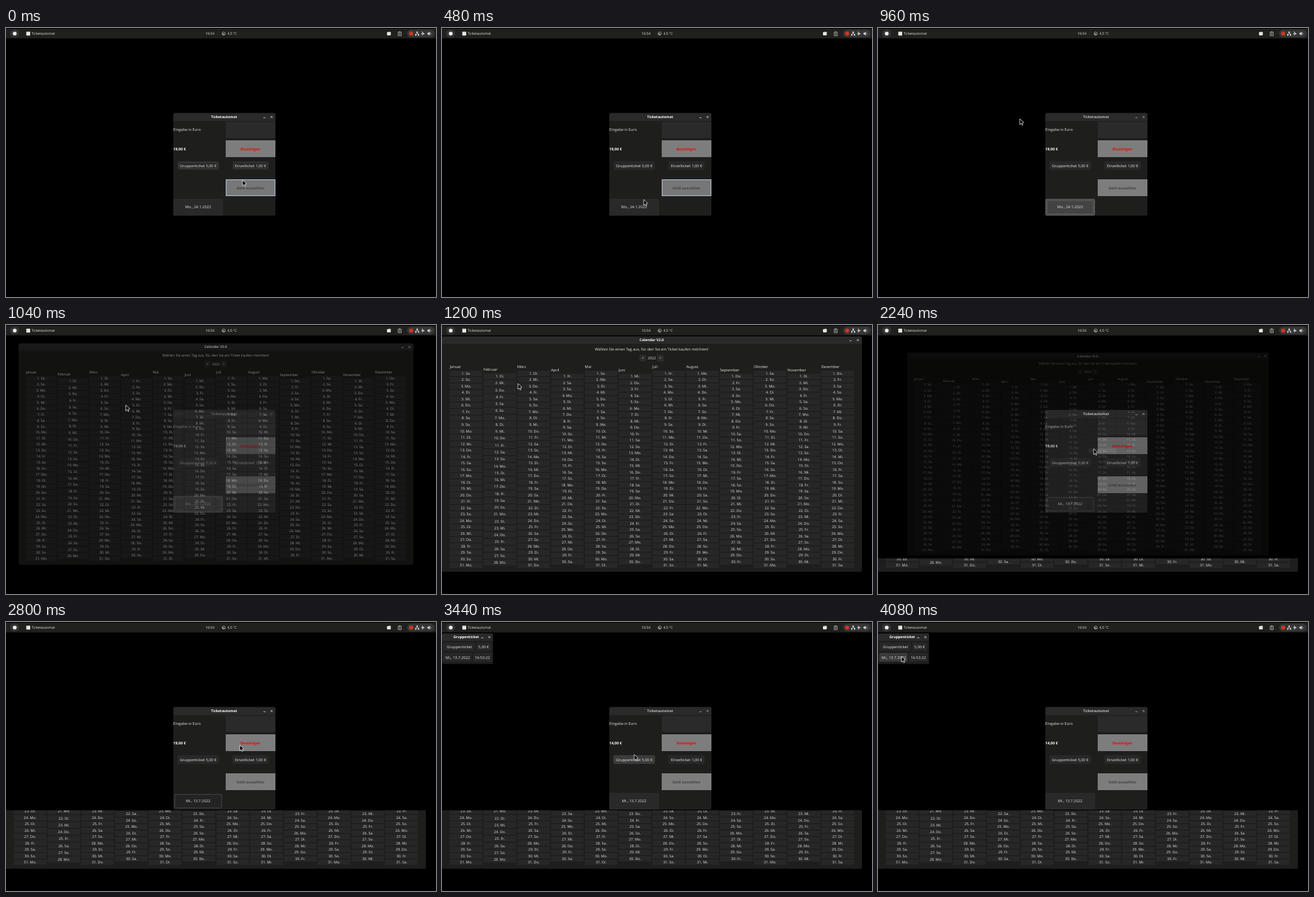
Write an HTML page that moves like this. It is 640 by 400 pixels and loops after 4.16 s.

```html
<!DOCTYPE html>
<html lang="de">
<head>
<meta charset="utf-8">
<title>Ticketautomat</title>
<style>
html, body { margin: 0; width: 100%; height: 100%; overflow: hidden; background: #000; }
svg { display: block; width: 100%; height: 100%; }
text { font-family: "Open Sans", "Noto Sans", sans-serif; text-rendering: geometricPrecision; white-space: pre; }
</style>
</head>
<body>
<svg id="stage" viewBox="0 0 640 400" xmlns="http://www.w3.org/2000/svg"></svg>
<script>
const LOOP = 4160, STEP = 80;
const BODY = '#1e1e1d', TITLE = '#2a2a2a', CELL = '#272727', HOVER = '#494949', GRAY = '#7d7d7d';
const stage = document.getElementById('stage');

// y is the middle of the capitals
function label(x, y, s, o = {}) {
  const { size = 5.63, fill = '#e2e2e2', bold = false, anchor = 'middle' } = o;
  return `<text x="${x}" y="${(y + size * 0.355).toFixed(2)}" font-size="${size}" fill="${fill}"` +
    ` font-weight="${bold ? 700 : 400}" text-anchor="${anchor}">${s}</text>`;
}

function box(x, y, w, h, fill, r = 0, stroke = 'none', sw = 0.7) {
  return `<rect x="${x}" y="${y}" width="${w}" height="${h}" rx="${r}" fill="${fill}" stroke="${stroke}" stroke-width="${sw}"/>`;
}

function line(d, stroke = '#ddd', w = 0.8) {
  return `<path d="${d}" fill="none" stroke="${stroke}" stroke-width="${w}"/>`;
}

function shape(d, fill = '#e4e4e4') {
  return `<path d="${d}" fill="${fill}"/>`;
}

function frameBox(x, y, w, h, bar, title, tx, minX, closeX, dim) {
  const c = dim ? '#bcbcbc' : '#fff', my = y + bar / 2;
  return box(x, y, w, h, BODY, 2) +
    shape(`M${x} ${y + bar}V${y + 3}q0 -3 3 -3H${x + w - 3}q3 0 3 3V${y + bar}Z`, TITLE) +
    label(tx, my, title, { size: 5.27, bold: true, fill: c }) +
    line(`M${minX - 1.5} ${my + 1}h3M${closeX - 1.4} ${my - 1.4}l2.8 2.8m0 -2.8l-2.8 2.8`, c, 0.7);
}

function topBar() {
  const small = { size: 5.22 };
  return box(0, 1, 640, 14.5, '#20201f', 1) +
    box(6, 2.5, 13.5, 11.5, '#343434', 5.7) +
    '<circle cx="13" cy="8.3" r="2.8" fill="#eee"/>' +
    box(30.2, 5.4, 5.8, 5.8, '#e6e6e6', 0.6) +
    label(38, 8.3, 'Ticketautomat', { ...small, anchor: 'start' }) +
    label(303.6, 8.3, '16:54', small) +
    '<circle cx="324" cy="8.3" r="2.3" fill="none" stroke="#ccc" stroke-width=".7"/>' +
    line('M321.4 8.5h3M323 9.8h2.4', '#ccc', 0.7) +
    label(329.5, 8.3, '4,5 °C', { ...small, anchor: 'start' }) +
    shape('M567 6.3h2l1 -.8 2.7 .6v4q0 1 -1.2 1h-3.3q-1.2 0 -1.2 -1Z') +
    line('M583.7 6.2h4.6v5.2h-4.6ZM585 5.6h2M585 8h2M585 9.6h2', '#ccc', 0.7) +
    box(597, 2.5, 41, 11.5, '#363636', 5.7) +
    '<circle cx="603" cy="8.3" r="3" fill="#d8341c"/>' +
    shape('M610.9 5.5h2.2v2h-2.2ZM609 9.2h2v2h-2ZM613 9.2h2v2h-2Z') +
    line('M612 7v1.4M610 9.5v-1.1h4v1.1', '#ddd', 0.5) +
    shape('M618 7.8l2 .1-1 -2.4h.8l1.8 2.4h1.4q.8 .4 0 .8h-1.4l-1.8 2.4h-.8l1 -2.4-2 .1Z') +
    shape('M627.3 7.2h1.4l1.9 -1.8v5.8l-1.9 -1.8h-1.4Z') +
    line('M631.7 6.6q1.2 1.7 0 3.4', '#ddd', 0.6);
}

// Each month column is centred vertically, so short months start lower.
function calendar() {
  const days = ['So', 'Mo', 'Di', 'Mi', 'Do', 'Fr', 'Sa'];
  const months = 'Januar,Februar,März,April,Mai,Juni,Juli,August,September,Oktober,November,Dezember'.split(',');
  let out = frameBox(0, 17, 625, 350, 11, 'Calendar V2.0', 312, 608, 619, false) +
    label(312, 35.5, 'Wählen Sie einen Tag aus, für den Sie ein Ticket kaufen möchten!') +
    box(294, 44, 10, 10.5, '#2b2b2b', 1.5) + box(320, 44, 10, 10.5, '#2b2b2b', 1.5) +
    label(299, 49.3, '&lt;') + label(312.3, 49.3, '2022', { size: 5.4 }) + label(325, 49.3, '&gt;');
  months.forEach((name, m) => {
    const x = 11.5 + m * 50.27;
    const count = new Date(2022, m + 1, 0).getDate();
    const first = count === 31 ? 72 : 76.2;
    const pitch = count === 28 ? 10.26 : 9.51;
    const head = { 31: 62.2, 30: 66.7, 28: 65.7 }[count];
    out += label(x, head, name, { anchor: 'start' });
    for (let d = 1; d <= count; d++) {
      const y = first + (d - 1) * pitch;
      out += box(x, (y - pitch / 2 + 0.7).toFixed(2), 48.6, pitch - 1.4, CELL, 1) +
        label(x + 24.4, y, `${d}. ${days[new Date(2022, m, d).getDay()]}.`, { size: 5.4 });
    }
  });
  return out;
}

function julyHover() {
  const x = 11.5 + 6 * 50.27, y = 72 + 12 * 9.51;
  return box(x, y - 4.2, 48.6, 8.3, HOVER, 1) + label(x + 24.4, y, '13. Mi.', { size: 5.4 });
}

function dateButton(t) {
  const text = label(286, 266.4, t < 2240 ? 'Mo., 24.1.2022' : 'Mi., 13.7.2022');
  if (t >= 560 && t < 2240)
    return box(249.5, 254.5, 73, 24, '#474747', 1.5, '#707070') +
      box(251.7, 256.7, 68.6, 19.8, '#434343', 1, '#6c6c6c') + text;
  if (t >= 2240 && t < 3040)
    return box(251, 256.4, 70, 20.2, '#232323', 1, '#565656') + text;
  return box(249, 254, 74, 25, '#292929', 1.5) + text;
}

function ticketWindow(t) {
  const dim = (t >= 960 && t < 2240) || t >= 3360;
  const start = t < 240;
  const bold = { size: 5.5, bold: true };
  const onGroup = t >= 3040 && t < 3840;
  const ring = onGroup && t < 3360 || start;
  return frameBox(249, 126.5, 152, 152.5, 11.8, 'Ticketautomat', 324.6, 384.7, 395.3, dim) +
    box(327, 139.5, 74, 24, '#2a2a2a') +
    label(249, 151, 'Eingabe in Euro', { anchor: 'start' }) +
    label(249, 180, t < 3280 ? '19,00 €' : '14,00 €', { ...bold, fill: '#fff', anchor: 'start' }) +
    box(327, 167, 74, 25, GRAY) +
    label(363.7, 180, 'Bestätigen', { ...bold, fill: '#f00a0a' }) +
    box(255, 198, 62, 13, onGroup ? '#3b3b3b' : '#282828', 2) +
    box(337, 198, 54, 13, '#282828', 2) +
    (ring ? box(257.2, 200, 57.6, 9, 'none', 1, '#555', 0.6) : '') +
    (start ? box(339, 200, 50, 9, 'none', 1, '#474747', 0.6) : '') +
    label(286, 204.7, 'Gruppenticket 5,00 €') +
    label(364, 204.7, 'Einzelticket 1,00 €') +
    (t < 560 ? box(327.6, 225.6, 72.8, 23.8, '#777', 0, '#a6b2c4', 1.2) : box(327, 225, 74, 25, GRAY)) +
    label(363.8, 237.8, 'Geld auszahlen', { ...bold, fill: '#454545' }) +
    dateButton(t);
}

function receipt(t) {
  const hover = t >= 3920;
  return frameBox(0, 17, 76, 45.5, 11, 'Gruppenticket', 36, 60, 70.5, false) +
    box(2, 30.5, 47, 12.5, CELL, 1.5) + box(51, 30.5, 22.5, 12.5, CELL, 1.5) +
    box(2, 46, 42, 13, hover ? '#3a3a3a' : CELL, 1.5) + box(46, 46, 28, 13, CELL, 1.5) +
    label(26, 37, 'Gruppenticket') + label(62, 37, '5,00 €') +
    label(23.5, 52.7, 'Mi., 13.7.2022') + label(60, 52.7, '16:53:22');
}

// time, x, y of the pointer
const path = [
  [0, 352, 226], [80, 353, 227], [160, 353, 227], [560, 287, 262], [880, 286, 262],
  [960, 211, 135], [1200, 113, 87], [1440, 88, 110], [1520, 160, 142], [1680, 373, 221],
  [1840, 321, 184], [2640, 321, 184], [2800, 348, 183], [3040, 287, 199], [3120, 286, 197],
  [3760, 286, 197], [3840, 128, 112], [3920, 31, 55], [4000, 31, 55], [4080, 35, 51], [4160, 35, 51]
];

function pointer(t) {
  const i = path.findIndex(p => p[0] > t);
  const [a, x, y] = path[i - 1], [b, u, v] = path[i];
  const k = (t - a) / (b - a);
  return [x + (u - x) * k, y + (v - y) * k];
}

// Scale and opacity of the calendar window; null while hidden
function calendarState(t) {
  if (t < 1040 || t > 2240) return null;
  if (t === 1040) return [0.94, 0.6];
  if (t === 2240) return [0.861, 0.3];
  return [1, 1];
}

stage.innerHTML = `<defs><g id="month">${calendar()}</g>
  <clipPath id="cut"><rect id="cutBox" x="0" y="280" width="640" height="120"/></clipPath></defs>
  <rect width="640" height="400"/>${topBar()}
  <g id="rest" clip-path="url(#cut)"><use href="#month"/></g>
  <g id="machine"></g>
  <g id="cal"><use href="#month"/><g id="day">${julyHover()}</g></g>
  <g id="slip"></g>
  <path id="mouse" d="M0 0V8.6L2.1 6.9L3.4 9.6L4.7 9L3.5 6.3L6 5.6Z" fill="#000" stroke="#f4f4f4" stroke-width=".75" stroke-linejoin="round"/>`;

const part = id => document.getElementById(id);
const show = (id, on) => part(id).setAttribute('display', on ? 'inline' : 'none');

function draw(t) {
  part('machine').innerHTML = ticketWindow(t);

  const state = calendarState(t);
  show('cal', state);
  if (state) {
    const [s, o] = state;
    part('cal').setAttribute('transform', `translate(312.5 192) scale(${s}) translate(-312.5 -192)`);
    part('cal').setAttribute('opacity', o);
  }
  show('day', t >= 1840);

  show('rest', t >= 2240);
  part('cutBox').setAttribute('y', t === 2240 ? 347 : 280);

  show('slip', t >= 3360);
  part('slip').innerHTML = receipt(t);
  part('slip').setAttribute('opacity', t === 3360 ? 0.6 : 1);

  const [x, y] = pointer(t);
  part('mouse').setAttribute('transform', `translate(${x} ${y})`);
}

let last = -1;
const begin = performance.now();
function tick() {
  const t = Math.floor(((performance.now() - begin) % LOOP) / STEP) * STEP;
  if (t !== last) draw(last = t);
  requestAnimationFrame(tick);
}
tick();
</script>
</body>
</html>
```
